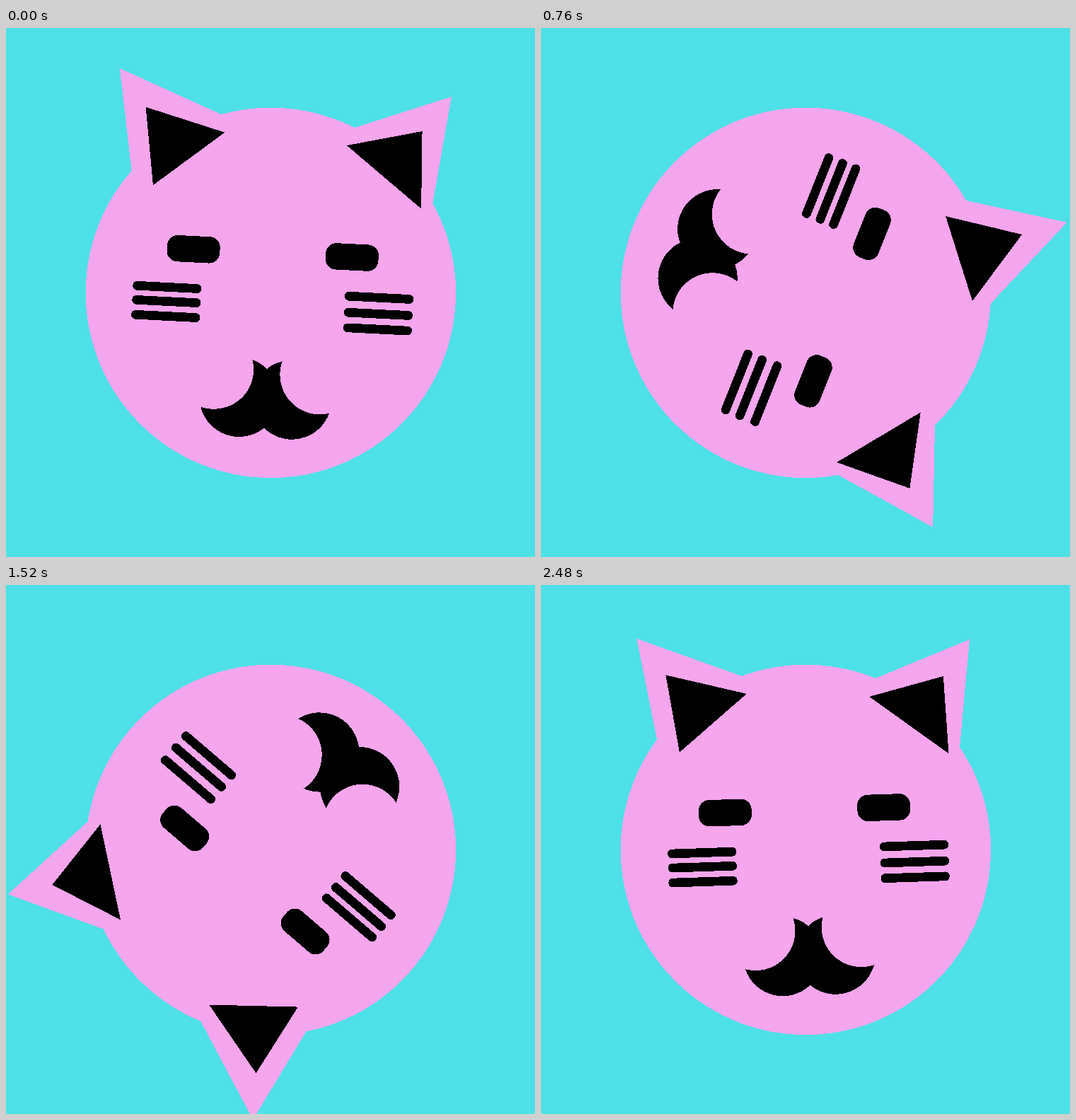
Write an HTML page that moves like this. It is 748 px wide and 748 px high and loops after 2500 ms.

```html
<!DOCTYPE html>
<html lang="en">
<head>
<meta charset="utf-8">
<title>Spinning cat</title>
<style>
  html, body { margin: 0; width: 100%; height: 100%; overflow: hidden; background: #4de0e6; }
  svg { display: block; width: 748px; height: 748px; shape-rendering: crispEdges; }
  .skin { fill: #f5a6ed; }
</style>
</head>
<body>
<svg viewBox="0 0 748 748">
  <g transform="translate(374.4 374.4) scale(.748)">
    <g id="cat">
      <g class="skin">
        <circle r="350"/>
        <path d="M-306.4-409.5L-57.6-311.5L-262.3-145.7Z"/>
        <path d="M322.7-387.3L72.3-293.2L289.6-121.9Z"/>
      </g>
      <path d="M-253.6-338.9L-102-298.4L-232.4-192Z"/>
      <path d="M129.5-285.3L270.7-319.3L276.1-172.9Z"/>
      <g id="bars"></g>
      <circle cx="-50" cy="200" r="75"/>
      <circle cx="50" cy="200" r="75"/>
      <circle class="skin" cx="-100" cy="150" r="75"/>
      <circle class="skin" cx="100" cy="150" r="75"/>
    </g>
  </g>
</svg>
<script>
  const LOOP = 2500, STEP = 20, TURN = 0.05; // ms, ms, radians per step
  const cat = document.getElementById('cat');
  const bars = document.getElementById('bars');

  function bar(cx, cy, width, height, rx) {
    const rect = document.createElementNS('http://www.w3.org/2000/svg', 'rect');
    const attrs = { x: cx - width / 2, y: cy - height / 2, width, height, rx };
    for (const name in attrs) rect.setAttribute(name, attrs[name]);
    bars.append(rect);
  }

  for (const x of [-150, 150]) bar(x, -75, 100, 50, 20);
  for (const y of [-0.9, 26, 54]) bar(-196.2, y, 130, 17, 7.8);
  for (const y of [-1, 29.8, 58.8]) bar(205, y, 130, 17, 7.8);

  const start = performance.now();

  function draw() {
    const time = Math.max(0, performance.now() - start) % LOOP;
    const angle = TURN * (Math.floor(time / STEP) + 1);
    cat.setAttribute('transform', `rotate(${angle * 180 / Math.PI})`);
    requestAnimationFrame(draw);
  }
  draw();
</script>
</body>
</html>
```
